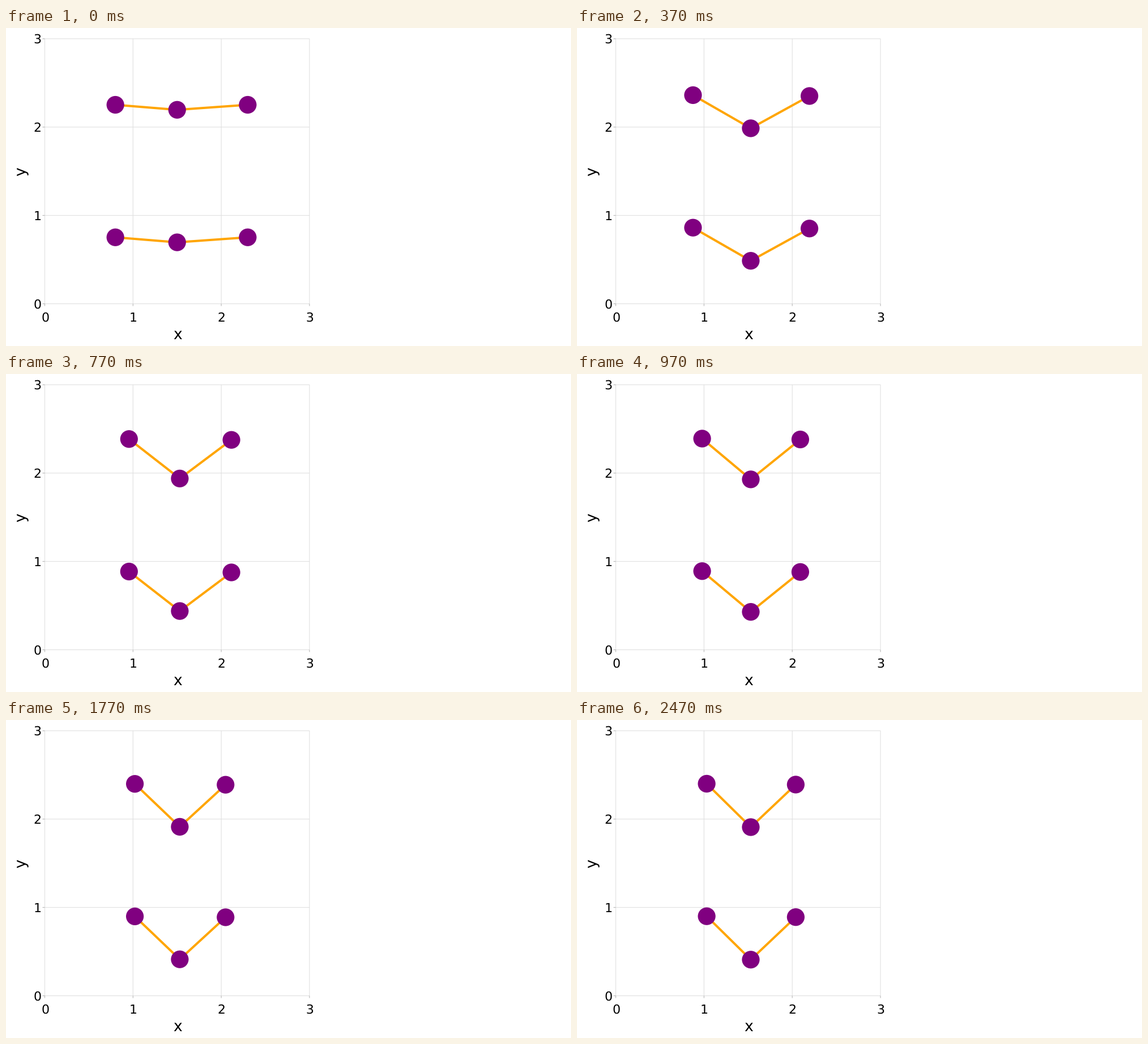
Write a matplotlib script that moves like this. It is 998 px wide and 561 px high and loops after 2510 ms.

```python
import numpy as np
import matplotlib
import matplotlib.pyplot as plt
from matplotlib.animation import FuncAnimation
from matplotlib.patches import Circle

W, H, DPI = 998, 561, 100
LOOP_MS, TICK_MS = 2510, 10
FPS, LAST_POSE = 30, 74
X0, Y0, UNIT = 68.5, 486.5, 155.85

matplotlib.rcParams["font.family"] = "DejaVu Sans"
matplotlib.rcParams["text.hinting"] = "none"


def to_px(x, y):
    return X0 + UNIT * np.asarray(x), Y0 - UNIT * np.asarray(y)


def pt(px):
    return px * 72 / DPI


fig = plt.figure(figsize=(W / DPI, H / DPI), dpi=DPI, facecolor="white")
ax = fig.add_axes([0, 0, 1, 1])
ax.set_xlim(0, W)
ax.set_ylim(H, 0)
ax.axis("off")


def rule(xs, ys, color, width, z):
    line, = ax.plot(xs, ys, color=color, lw=pt(width), zorder=z,
                    solid_capstyle="butt", snap=False)
    return line


def label(x, baseline, text, size):
    ax.text(x, baseline, text, fontsize=pt(size), color="black",
            ha="left", va="baseline")


# Grid, ticks and axis labels
for n in range(4):
    gx, gy = to_px(n, n)
    left, bottom = to_px(0, 0)
    right, top = to_px(3, 3)
    rule([gx, gx], [bottom, top], "#e0e0e0", 1.1, 1)
    rule([left, right], [gy, gy], "#e0e0e0", 1.1, 1)
    rule([gx, gx], [bottom, bottom + 4], "#b4b4b4", 1.1, 1)
    rule([left - 4, left], [gy, gy], "#b4b4b4", 1.1, 1)
    label(gx + 0.7 - 7.1, 517.5, str(n), 22.2)
    label(55.2 - 7.1, gy + 8.2, str(n), 22.2)
label(302.7 - 7.9, 549, "x", 26.7)
ax.text(26.7, 253, "y", fontsize=pt(26.7), rotation=90,
        ha="center", va="center")


def chain(t):
    """Vertices of a three-point chain relaxing to a right angle."""
    slow = np.exp(-1.81 * t)
    half = 0.501 + 0.318 * slow - 0.069 * np.exp(-7.2 * t)
    depth = 0.4885 - 0.184 * slow - 0.2478 * np.exp(-4.85 * t - 4.29 * t * t)
    mid = 1.53 - 0.03 * np.exp(-12 * t)
    tilt = 0.0049 * (1 - np.exp(-12 * t))
    # The centre of mass stays fixed
    ends = (4.6 - mid) / 2
    xs = np.array([ends - half, mid, ends + half])
    ys = np.array([depth / 3 + tilt, -2 * depth / 3, depth / 3 - tilt])
    return xs, ys


CENTRES = (2.2333, 0.7333)
bonds = [rule([], [], "#ffa500", 4, 2) for _ in CENTRES]
beads = [[ax.add_patch(Circle((0, 0), 15.6, fc="#800080", ec="none", zorder=3))
          for _ in range(3)] for _ in CENTRES]


def update(tick):
    # Poses change 30 times a second, rounded to hundredths
    pose = min(int((tick + 0.5) * FPS * TICK_MS / 1000), LAST_POSE)
    xs, ys = chain(pose / FPS)
    for cy, bond, dots in zip(CENTRES, bonds, beads):
        px, py = to_px(xs, ys + cy)
        bond.set_data(px, py)
        for dot, x, y in zip(dots, px, py):
            dot.center = (x, y)
    return bonds + [dot for dots in beads for dot in dots]


anim = FuncAnimation(fig, update, frames=LOOP_MS // TICK_MS, interval=TICK_MS,
                     init_func=lambda: update(0), repeat=True, repeat_delay=0)
plt.show()
```
